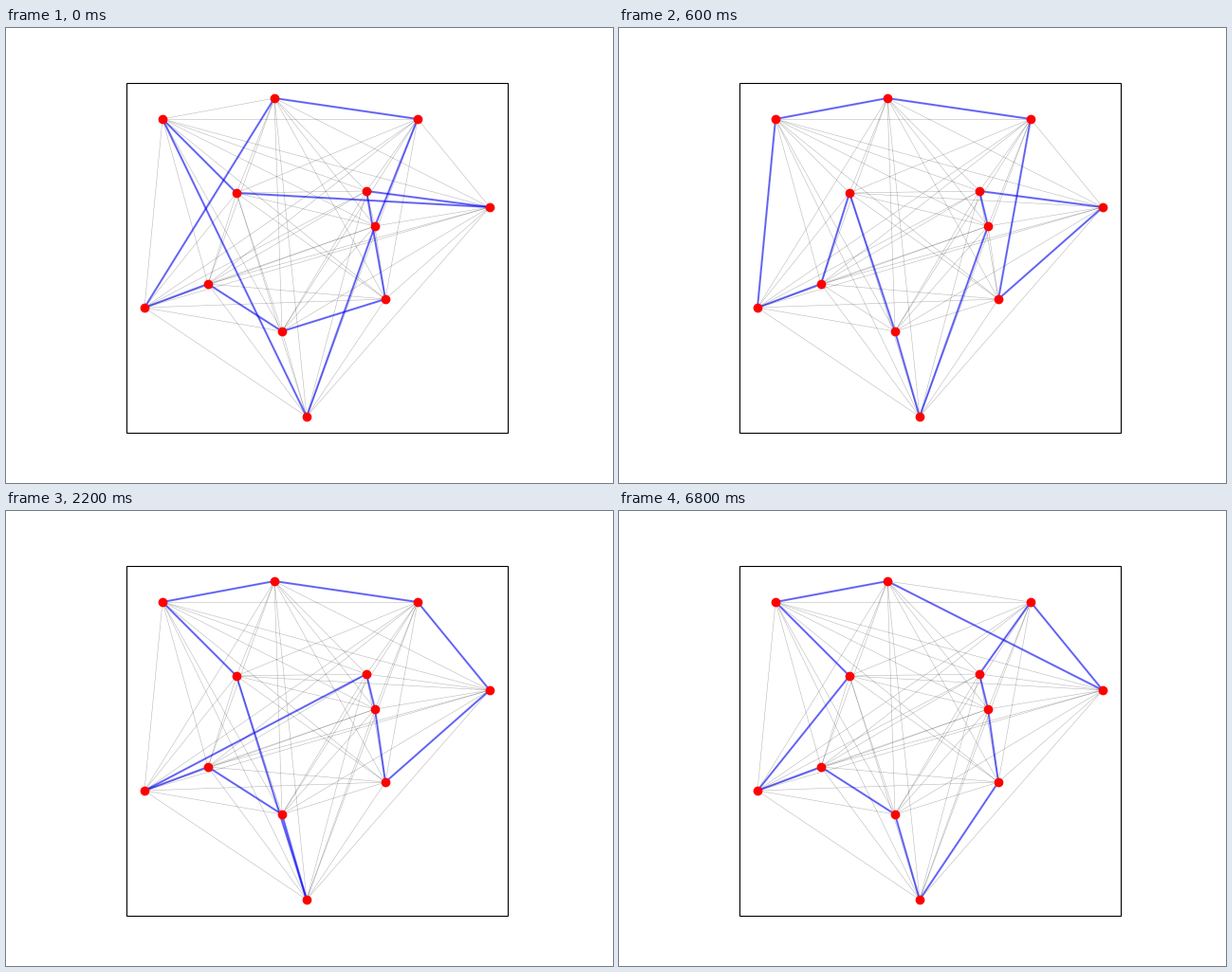
Recreate the animation shown at these times as a matplotlib script. Size 640x480 px, loop 8 s.

```python
from itertools import combinations

import matplotlib.pyplot as plt
from matplotlib.animation import FuncAnimation
from matplotlib.collections import LineCollection
from matplotlib.patches import Rectangle

W, H, DPI = 640, 480, 100
STEP_MS, LOOP_MS = 200, 8000

# City positions in stage pixels, y pointing down
CITIES = {
    "A": (165, 96), "B": (283, 74), "C": (434, 96), "D": (243, 174),
    "E": (380, 172), "F": (389, 209), "G": (213, 270), "H": (400, 286),
    "I": (146, 295), "J": (510, 189), "K": (317, 410), "L": (291, 320),
}

# Start time in ms and closed visiting order
TOURS = [
    (0, "ADJEHLGIBCFK"),
    (200, "ABJCEFHKLGID"),
    (600, "ABCHJEFKLDGI"),
    (1600, "ABDLHFECJKIG"),
    (2000, "ABDFECJHKLGI"),
    (2200, "ABCJHFEIGLKD"),
    (4400, "ADBCFEJHKLGI"),
    (6800, "ABJCEFHKLGID"),
]


def segments(pairs):
    return [(CITIES[a], CITIES[b]) for a, b in pairs]


def tour_at(ms):
    return [order for start, order in TOURS if start <= ms][-1]


fig = plt.figure(figsize=(W / DPI, H / DPI), dpi=DPI, facecolor="white")
ax = fig.add_axes([0, 0, 1, 1])
ax.set_xlim(0, W)
ax.set_ylim(H, 0)
ax.axis("off")

ax.add_patch(Rectangle((127, 58), 402, 369, fill=False,
                       edgecolor="black", linewidth=0.8))
ax.add_collection(LineCollection(segments(combinations(CITIES, 2)),
                                 colors="black", linewidths=0.4,
                                 alpha=0.28, zorder=2), autolim=False)
route = LineCollection([], colors="blue", linewidths=1.5, alpha=0.55, zorder=3)
ax.add_collection(route, autolim=False)
ax.plot(*zip(*CITIES.values()), "ro", markersize=6, zorder=4)


def update(frame):
    order = tour_at(frame * STEP_MS)
    route.set_segments(segments(zip(order, order[1:] + order[0])))
    return (route,)


anim = FuncAnimation(fig, update, frames=LOOP_MS // STEP_MS,
                     interval=STEP_MS, repeat=True, repeat_delay=0)
plt.show()
```
